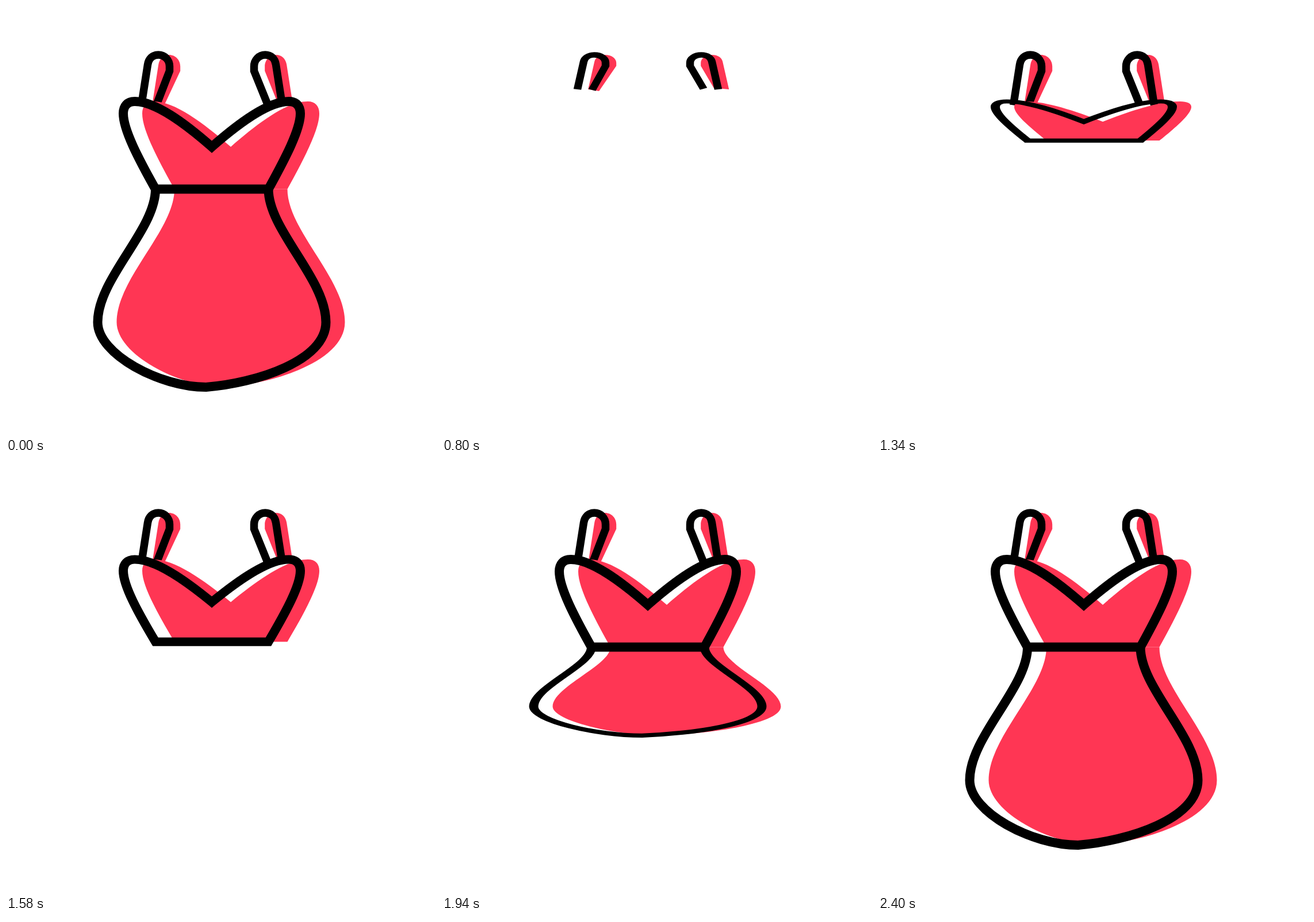
Write an HTML page that moves like this. It is 748 by 748 pixels and loops after 2440 ms.

```html
<!DOCTYPE html>
<html lang="en">
<head>
<meta charset="utf-8">
<title>Dress</title>
<style>
  html, body { margin: 0; width: 100%; height: 100%; overflow: hidden; background: #fff; }
  svg { display: block; width: 100vw; height: 100vh; }
  .fill { fill: #ff3654; }
  .line { fill: none; stroke: #000; stroke-width: 16; stroke-miterlimit: 10; }
  .thin { stroke-width: 13.5; }
</style>
</head>
<body>
<svg viewBox="0 0 748 748"></svg>
<script>
const svg = document.querySelector('svg');
const LOOP = 2440, HOLD = 300, STEP = 600, TICK = 20;

const path = (cls, d, transform = '') => `<path class="${cls}" d="${d}" transform="${transform}"/>`;
const mirror = width => `translate(${width} 0) scale(-1 1)`;

// A strap loop; its inner leg stops at the given point.
const strap = end =>
  `M235.5 172.5L246.5 102C248 92 255 85 265 85C276 85 284.5 94 284.5 105V113L${end}`;

const bodice = 'M260 318.5C230 265 204 215 204 187C204 174 211 166 224 166' +
  'C260 166 310 203 358 245C406 203 456 166 492 166C505 166 512 174 512 187' +
  'C512 215 486 265 456.5 318.5Z';

const skirt = 'M260 318.5C260 390 159.5 474 159.5 550C159.5 606 268 663 348 663' +
  'C436 656 556.5 617 556.5 550C556.5 474 456.5 390 456.5 318.5';

const shaded = d => path('fill', d, 'translate(33 0)') + path('line', d);

// Each part unrolls downwards from its top edge; listed back to front.
const parts = [
  { order: 2, top: 318.5, art: shaded(skirt) },
  { order: 0, top: 85, art:
    path('fill', strap('254.5 177'), 'translate(18.7 0)') +
    path('fill', strap('262 169'), mirror(734.7)) +
    path('line thin', strap('261 174')) +
    path('line thin', strap('261 171'), mirror(716)) },
  { order: 1, top: 166, art: shaded(bodice) }
];

svg.innerHTML = parts.map(p => `<g>${p.art}</g>`).join('');
parts.forEach((p, i) => p.node = svg.children[i]);

// cubic-bezier(1/3, 0, 0, 1)
function ease(x) {
  if (x <= 0) return 0;
  if (x >= 1) return 1;
  let lo = 0, hi = 1;
  for (let i = 0; i < 30; i++) {
    const u = (lo + hi) / 2;
    if (u - 2 * u * u + 2 * u ** 3 < x) lo = u; else hi = u;
  }
  return lo * lo * (3 - 2 * lo);
}

function draw(now) {
  const t = Math.floor((now % LOOP) / TICK) * TICK;
  for (const { node, order, top } of parts) {
    const s = t < HOLD ? 1 : ease((t - STEP * (order + 1)) / STEP);
    node.setAttribute('transform', `matrix(1 0 0 ${s} 0 ${top * (1 - s)})`);
    node.setAttribute('visibility', s > 0.005 ? 'visible' : 'hidden');
  }
}

const start = performance.now();
function loop() {
  draw(performance.now() - start);
  requestAnimationFrame(loop);
}
loop();
</script>
</body>
</html>
```
